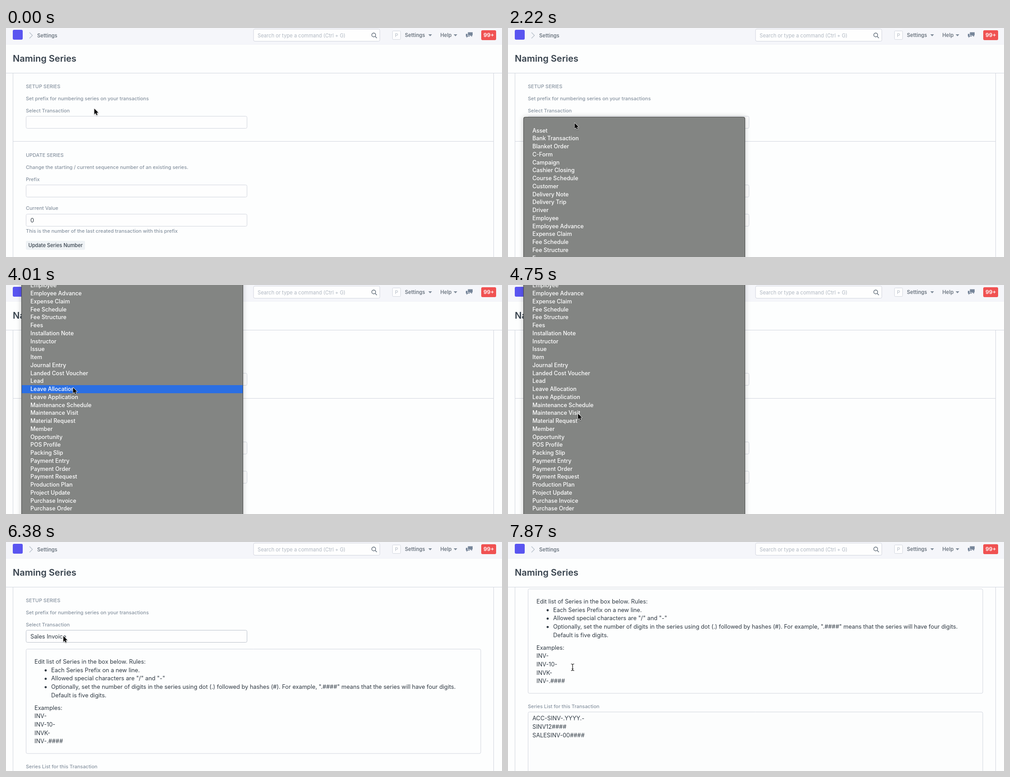
An HTML page with a canvas that plays this animation: 1098x510 px, repeating every 8 s.

```html
<!DOCTYPE html>
<html lang="en">
<head>
<meta charset="utf-8">
<title>Naming Series</title>
<style>
  html, body { margin: 0; width: 100%; height: 100%; overflow: hidden; background: #fdfefe; }
  canvas { display: block; width: 1098px; height: 510px; }
</style>
</head>
<body>
<canvas id="stage" width="1098" height="510"></canvas>
<script>
const ctx = document.getElementById('stage').getContext('2d');
const W = 1098, H = 510, LOOP = 8000;
const INK = '#36414c', MUTED = '#8793a0', LINE = '#d1d5de', FOCUS = '#b9c0ca', PAGE = '#fdfefe';
const ROW = 17.75, MENU_LEFT = 34, MENU_RIGHT = 525;

const MENU_ITEMS = ['', 'Asset', 'Bank Transaction', 'Blanket Order', 'C-Form', 'Campaign',
  'Cashier Closing', 'Course Schedule', 'Customer', 'Delivery Note', 'Delivery Trip', 'Driver',
  'Employee', 'Employee Advance', 'Expense Claim', 'Fee Schedule', 'Fee Structure', 'Fees',
  'Installation Note', 'Instructor', 'Issue', 'Item', 'Journal Entry', 'Landed Cost Voucher',
  'Lead', 'Leave Allocation', 'Leave Application', 'Maintenance Schedule', 'Maintenance Visit',
  'Material Request', 'Member', 'Opportunity', 'POS Profile', 'Packing Slip', 'Payment Entry',
  'Payment Order', 'Payment Request', 'Production Plan', 'Project Update', 'Purchase Invoice',
  'Purchase Order'];

// [time, x, y] of the pointer tip; each pose holds until the next
const POINTER = [[0, 195, 179], [150, 183, 170], [740, 172, 142], [888, 146, 96], [1037, 116, 66],
  [1186, 104, 84], [1334, 113, 130], [1483, 131, 178], [1631, 144, 208], [1780, 147, 215],
  [1920, 147, 211], [4010, 148, 228], [4155, 152, 263], [4300, 154.5, 286], [6090, 150, 268],
  [6235, 136, 231], [6380, 126.5, 209], [7120, 132, 236], [7270, 143, 279]];
const SCROLL = [[0, 0], [7570, 45], [7720, 92], [7870, 134]];

const poseAt = (keys, t) => keys.reduce((held, key) => key[0] <= t ? key : held);

// y is the middle of the capital letters
function text(str, x, y, size, color = INK, weight = 400) {
  ctx.font = `${weight} ${size}px Inter, sans-serif`;
  ctx.fillStyle = color;
  ctx.fillText(str, x, Math.round(y + size * 0.36));
}

function box(x, y, w, h, fill, stroke, radius = 3) {
  ctx.beginPath();
  ctx.roundRect(x, y, w, h, radius);
  if (fill) { ctx.fillStyle = fill; ctx.fill(); }
  if (stroke) { ctx.strokeStyle = stroke; ctx.lineWidth = 1; ctx.stroke(); }
}

function rect(x, y, w, h, color) {
  ctx.fillStyle = color;
  ctx.fillRect(x, y, w, h);
}

function polygon(points, fill) {
  ctx.beginPath();
  points.forEach(([x, y]) => ctx.lineTo(x, y));
  ctx.closePath();
  ctx.fillStyle = fill;
  ctx.fill();
}

const caret = x => polygon([[x, 14], [x + 8, 14], [x + 4, 18.5]], '#7d8a98');
const label = (str, y) => text(str, 44, y, 10.95, MUTED, 500);
const body = (str, x, y) => text(str, x, y, 12.76, '#2f3943');
const input = (y, stroke = LINE) => box(44.5, y + 0.5, 489, 27, '#fefefe', stroke);

function drawHeader() {
  rect(0, 0, W, 101, PAGE);
  rect(0, 0, W, 36, '#f5f6fa');
  rect(0, 36, W, 1, '#f0f2f6');
  rect(0, 100, W, 1, LINE);
  box(15, 4, 22, 22, '#5a55f0');

  ctx.lineWidth = 1.3;
  ctx.strokeStyle = '#b4bdc8';
  ctx.beginPath();
  ctx.moveTo(52, 10); ctx.lineTo(58.5, 16.5); ctx.lineTo(52, 23);
  ctx.stroke();
  text('Settings', 69, 16.5, 11.2, '#6c7680', 600);

  box(548, 2.5, 279.5, 27, '#fefefe', LINE);
  text('Search or type a command (Ctrl + G)', 557, 16.5, 11.15, '#b0b8c2');
  ctx.strokeStyle = '#5f6b78';
  ctx.lineWidth = 1.4;
  ctx.beginPath();
  ctx.arc(814, 15.5, 4.3, 0, Math.PI * 2);
  ctx.moveTo(817.2, 18.7); ctx.lineTo(821, 22.5);
  ctx.stroke();

  box(855.5, 6.5, 18, 19, '#fdfdfe', '#d3d7de', 2);
  text('P', 861, 16.5, 11, '#b6bdc6');
  text('Settings', 883, 15.5, 11.2, '#6c7680', 600);
  caret(935);
  text('Help', 961.5, 15.5, 11.2, '#6c7680', 600);
  caret(991);

  const slate = '#77869a';
  rect(1018, 13, 9, 6, slate);
  polygon([[1019.5, 18], [1023.5, 18], [1019.5, 22]], slate);
  rect(1021.5, 8.5, 12, 9, '#f5f6fa');
  rect(1022.5, 9.5, 10.5, 7, slate);
  polygon([[1027.5, 16], [1031.5, 16], [1031.5, 20]], slate);

  box(1052, 5, 33, 22, '#f05252');
  text('99+', 1057, 16, 12.1, '#fff', 600);
  text('Naming Series', 15, 68, 20.05, INK, 600);
}

function drawSetup(value, stroke) {
  label('SETUP SERIES', 130);
  label('Set prefix for numbering series on your transactions', 157);
  label('Select Transaction', 184);
  input(196, stroke);
  body(value, 54, 210.5);
}

function drawUpdate() {
  rect(15, 252, 1065, 1, LINE);
  label('UPDATE SERIES', 283);
  label('Change the starting / current sequence number of an existing series.', 310);
  label('Prefix', 337);
  input(349);
  label('Current Value', 401.5);
  input(414);
  body('0', 54, 428.5);
  label('This is the number of the last created transaction with this prefix', 452);
  box(44, 474, 131, 20, '#eef2f5');
  text('Update Series Number', 49.5, 484, 11.1, INK, 500);
}

function drawRules() {
  box(44.5, 238.5, 1006.5, 232.5, null, LINE);
  body('Edit list of Series in the box below. Rules:', 63, 266.5);
  ['Each Series Prefix on a new line.',
   'Allowed special characters are "/" and "-"',
   'Optionally, set the number of digits in the series using dot (.) followed by hashes (#). For example, ".####" means that the series will have four digits.',
   'Default is five digits.'].forEach((line, i) => {
    const y = 285.2 + i * 18.65;
    body(line, 100, y);
    if (i === 3) return;
    ctx.beginPath();
    ctx.arc(87.8, y + 0.8, 2.4, 0, Math.PI * 2);
    ctx.fill();
  });
  ['Examples:', 'INV-', 'INV-10-', 'INVK-', 'INV-.####']
    .forEach((line, i) => body(line, 63, 369.2 + i * 18.65));
  label('Series List for this Transaction', 500);
  box(44.5, 512.5, 1006.5, 200, '#fcfdfd', LINE);
  ['ACC-SINV-.YYYY.-', 'SINV12####', 'SALESINV-00####']
    .forEach((line, i) => body(line, 54, 526.7 + i * 18.65));
}

function drawMenu(first, top, textEnd, activeRow) {
  const width = MENU_RIGHT - MENU_LEFT;
  ctx.save();
  ctx.shadowColor = 'rgba(0,0,0,.22)';
  ctx.shadowBlur = 12;
  box(MENU_LEFT, top, width, H + 20 - top, '#838583', null, 4);
  ctx.restore();
  box(MENU_LEFT + 0.5, top + 0.5, width - 1, H + 20 - top, null, '#444644', 4);
  if (activeRow >= 0) rect(35, Math.round(first + activeRow * ROW - 9), 489, 18, '#2b6fe3');
  ctx.save();
  ctx.beginPath();
  ctx.rect(MENU_LEFT, 0, width, textEnd);
  ctx.clip();
  MENU_ITEMS.forEach((item, i) => text(item, 54, first + i * ROW, 12.4, '#fff', 500));
  ctx.restore();
}

function drawFadingMenu() {
  ctx.save();
  rect(16, 0, 527, H, 'rgba(0,0,0,.008)');
  rect(MENU_LEFT, 0, MENU_RIGHT - MENU_LEFT, H, 'rgba(90,92,90,.018)');
  rect(MENU_RIGHT - 1, 0, 1, H, 'rgba(0,0,0,.02)');
  ctx.globalAlpha = 0.35;
  [12, 13, 14].forEach(i => text(MENU_ITEMS[i], 54, i * ROW - 212, 12.4, '#fff', 500));
  ctx.restore();
}

function drawArrow(x, y) {
  ctx.save();
  ctx.translate(x, y);
  ctx.beginPath();
  [[0.5, 0.5], [0.5, 13.2], [3.4, 10.4], [5.4, 15], [7.5, 14.1], [5.5, 9.7], [9.4, 9.5]]
    .forEach(p => ctx.lineTo(...p));
  ctx.closePath();
  ctx.lineJoin = 'round';
  ctx.lineWidth = 1.6;
  ctx.strokeStyle = '#fff';
  ctx.shadowColor = 'rgba(0,0,0,.35)';
  ctx.shadowBlur = 2;
  ctx.shadowOffsetY = 1;
  ctx.stroke();
  ctx.shadowColor = 'transparent';
  ctx.fillStyle = '#000';
  ctx.fill();
  ctx.restore();
}

function drawBeam(x, y) {
  const path = () => {
    ctx.beginPath();
    for (const s of [-1, 1]) {
      ctx.moveTo(x - 3.5, y + s * 7.5);
      ctx.quadraticCurveTo(x, y + s * 7.5, x, y + s * 5);
      ctx.quadraticCurveTo(x, y + s * 7.5, x + 3.5, y + s * 7.5);
    }
    ctx.moveTo(x, y - 6); ctx.lineTo(x, y + 6);
    ctx.moveTo(x - 2, y + 3.5); ctx.lineTo(x + 2, y + 3.5);
  };
  for (const [width, color] of [[2.6, '#fff'], [1.2, '#111']]) {
    path();
    ctx.lineWidth = width;
    ctx.strokeStyle = color;
    ctx.stroke();
  }
}

function draw(t) {
  const [, px, py] = poseAt(POINTER, t);
  const closed = t >= 5490;
  const chosen = t >= 5640;

  rect(0, 0, W, H, PAGE);
  rect(15, 101, 1, H, LINE);
  rect(1079, 101, 1, H, LINE);
  ctx.save();
  ctx.translate(0, -poseAt(SCROLL, t)[1]);
  drawSetup(chosen ? 'Sales Invoice' : '', closed ? FOCUS : LINE);
  if (chosen) drawRules(); else drawUpdate();
  ctx.restore();
  drawHeader();

  if (closed && !chosen) drawFadingMenu();
  else if (t >= 2960 && !closed) {
    const hovering = t >= 4010 && t < 4750;
    drawMenu(-212, -10, H, hovering ? Math.floor((py + 221) / ROW) : -1);
  } else if (t >= 2810 && t < 2960) drawMenu(-22.5, -10, 277, -1);
  else if (t >= 2220 && t < 2810) drawMenu(210.5, 198, H, t >= 2370 ? 0 : -1);

  if (t >= 7270) drawBeam(px, py); else drawArrow(px, py);
}

const start = performance.now();
function tick() {
  draw((performance.now() - start) % LOOP);
  requestAnimationFrame(tick);
}
tick();
</script>
</body>
</html>
```
